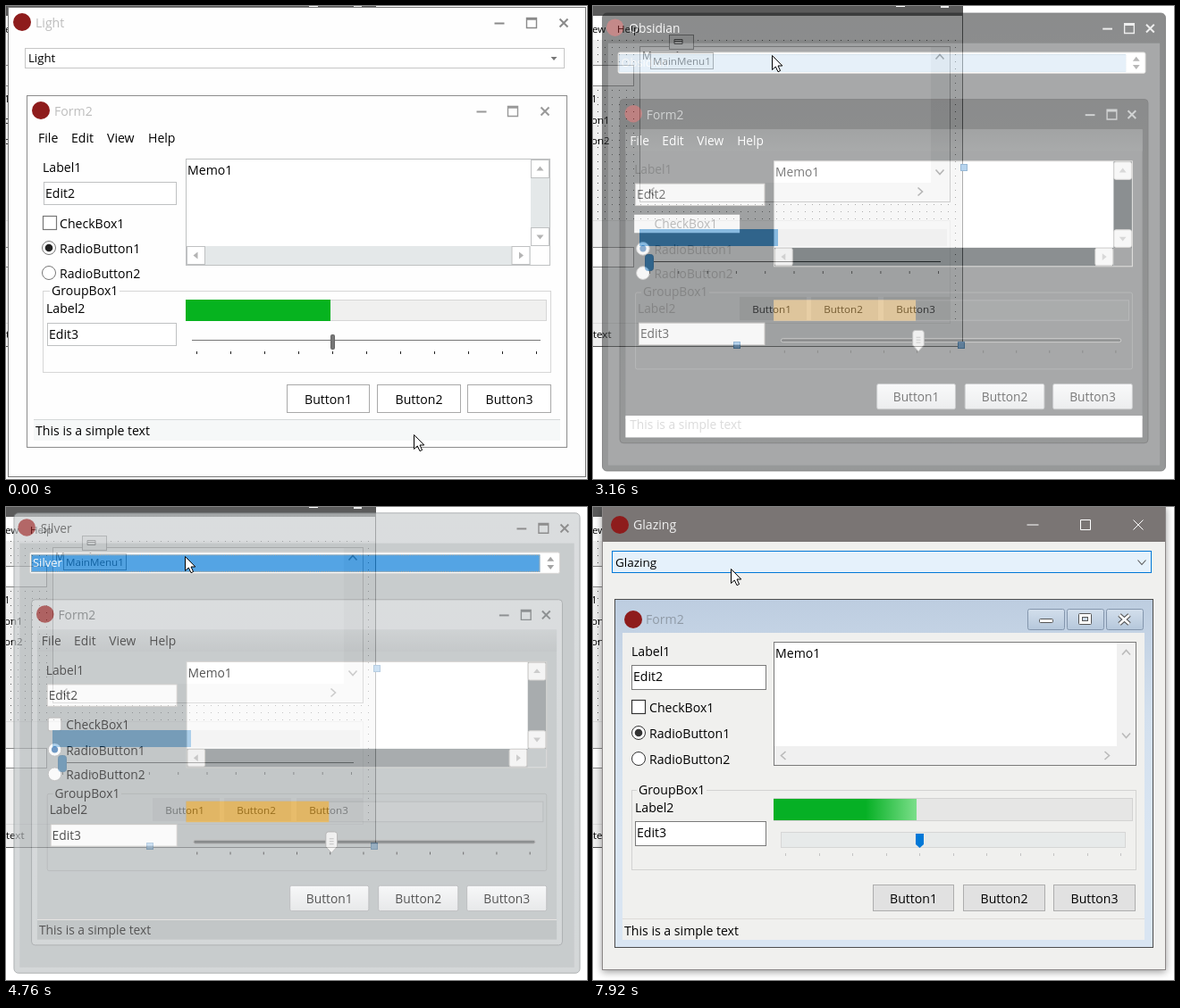
Write an HTML page that moves like this. It is 650 px wide and 530 px high and loops after 8000 ms.

```html
<!DOCTYPE html>
<html lang="en">
<head>
<meta charset="utf-8">
<title>Theme switcher</title>
<style>
  html, body { margin: 0; width: 100%; height: 100%; overflow: hidden; background: #fff; }
  svg { display: block; width: 650px; height: 530px; font: 14.1px "Open Sans", "Noto Sans", sans-serif; }
  #native { filter: drop-shadow(0 2px 4px rgba(0, 0, 0, .4)); }
</style>
</head>
<body>
<svg id="stage" viewBox="0 0 650 530"></svg>
<script>
const LOOP = 8000;
const LOGO = '#8e1c1c';

// Drawing helpers
const fillRect = (x, y, w, h, fill, more = '') =>
  `<rect x="${x}" y="${y}" width="${w}" height="${h}" fill="${fill}" ${more}/>`;
const box = (x, y, w, h, fill, stroke, r = 0, more = '') =>
  `<rect x="${x + .5}" y="${y + .5}" width="${w - 1}" height="${h - 1}" rx="${r}" fill="${fill}" stroke="${stroke}" ${more}/>`;
const path = (d, stroke, width = 1, fill = 'none') =>
  `<path d="${d}" stroke="${stroke}" stroke-width="${width}" fill="${fill}"/>`;
const circle = (x, y, r, fill, stroke = 'none') =>
  `<circle cx="${x}" cy="${y}" r="${r}" fill="${fill}" stroke="${stroke}"/>`;
const text = (x, y, s, fill = '#000', size = 14.1, anchor = 'start') =>
  `<text x="${x}" y="${y + 5}" fill="${fill}" font-size="${size}" text-anchor="${anchor}">${s}</text>`;
const gradient = (id, stops, axis = 'x2="0" y2="1"') => `<linearGradient id="${id}" ${axis}>` +
  stops.map((c, i) => `<stop offset="${i / (stops.length - 1)}" stop-color="${c}"/>`).join('') + '</linearGradient>';
const arrow = (x, y, turn, fill) =>
  `<path transform="translate(${x} ${y}) rotate(${turn})" d="M-4 2L0 -3L4 2Z" fill="${fill}"/>`;
const chevron = (x, y, turn, stroke, width = 1.6) =>
  `<path transform="translate(${x} ${y}) rotate(${turn})" d="M-4.5 2.5L0 -2.5L4.5 2.5" fill="none" stroke="${stroke}" stroke-width="${width}"/>`;

function captionButtons([a, b, c], y, color, width) {
  const s = width > 1 ? 4.5 : 5.5;
  return path(`M${a - s - 1} ${y + (width > 1 ? .5 : 0)}h${2 * s + 2}`, color, width) +
    path(`M${b - 5.5} ${y - 5.5}h11v11h-11z` + (width > 1 ? 'm0 1.5h11' : ''), color, width > 1 ? 1.4 : 1) +
    path(`M${c - s} ${y - s}l${2 * s} ${2 * s}m0 ${-2 * s}l${-2 * s} ${2 * s}`, color, width);
}

// Control positions: flat, framed and native looks
const FLAT = {
  label: [41, 181], edit2: [42, 197, 149, 26], check: [41, 235], radio: [48, 271, 299], tx: 60,
  group: [41, 319, 569, 92], groupText: 51, label2: [45, 339], edit3: [46, 355, 145, 26],
  memo: [201, 171, 408, 120], bar: [201, 329, 404, 24], fillW: 162, line: [208, 374, 390], ticks: [213, 387],
  buttons: [[314, 93], [415, 94], [516, 94]], by: [424, 32], status: [31, 463, 589, 24], statusText: [33, 476]
};
const FRAMED = {
  label: [39, 181], edit2: [40, 197, 149, 26], check: [41, 235], radio: [49, 272, 300], tx: 62,
  group: [40, 322, 571, 89], groupText: 49, label2: [43, 341], edit3: [44, 357, 145, 26],
  memo: [199, 171, 412, 122], bar: [199, 331, 408, 24], fillW: 163, line: [207, 377, 391], ticks: [211, 389],
  buttons: [[317, 91], [418, 92], [519, 92]], by: [427, 30], status: [29, 466, 593, 23], statusText: [31, 478]
};
const NATIVE = {
  label: [43, 162], edit2: [43, 177, 151, 28], check: [43, 216], radio: [51, 253, 282], tx: 63,
  group: [43, 317, 565, 90], groupText: 51, label2: [47, 337], edit3: [47, 352, 147, 28],
  memo: [202, 151, 406, 139], bar: [202, 326, 402, 26], fillW: 160, line: [210, 364, 386], ticks: [215, 388],
  buttons: [[313, 91], [414, 92], [515, 92]], by: [423, 30], status: [33, 461, 584, 24], statusText: [35, 475]
};

function scrollBars([x, y, w, h], t) {
  const right = x + w - 11.5, bottom = y + h - 11.5, cross = x + w - 33;
  if (t.kind === 'native') {
    return fillRect(x + w - 22, y + 1, 21, h - 2, '#f0f0f0') + fillRect(x + 1, y + h - 22, w - 2, 21, '#f0f0f0') +
      chevron(right, y + 12, 0, '#bababa') + chevron(right, y + h - 34, 180, '#bababa') +
      chevron(x + 11, bottom, -90, '#bababa') + chevron(cross, bottom, 90, '#bababa');
  }
  const button = (cx, cy, turn) => box(cx - 10.5, cy - 10.5, 21, 21, t.scrollBtn, t.border, t.r) + arrow(cx, cy, turn, '#b4b4b4');
  return fillRect(x + w - 22, y + 1, 21, h - 22, t.scroll) + fillRect(x + 1, y + h - 22, w - 23, 21, t.scroll) +
    fillRect(x + w - 22, y + h - 22, 21, 21, t.bg) +
    button(right, y + 11.5, 0) + button(right, y + h - 32.5, 180) +
    button(x + 11.5, bottom, -90) + button(cross, bottom, 90);
}

function slider(g, t) {
  const [x, y, w] = g.line;
  const [tx, ty] = g.ticks;
  let s = '';
  for (let i = 0; i < 11; i++) s += fillRect(Math.round(tx + i * (t.kind === 'native' ? 37.5 : 38)), ty, 1, 3, t.tick);
  if (t.kind === 'native')
    return s + box(x, y, w, 18, '#e7eaea', '#d6d6d6') + path('M361 366h9v12l-4.5 4l-4.5 -4z', 'none', 0, '#0078d7');
  if (t.kind === 'flat')
    return s + fillRect(x, y, w, 1, '#777') + box(363, y - 6, 5, 17, '#777', '#666', 1);
  return s + box(x, y - 2, w, 5, t.groove, '#a5a5a5', 2) +
    path('M358.5 369q0 -3 3 -3h7q3 0 3 3v14l-6.5 7l-6.5 -7z', '#999', 1, '#f1f1f0') +
    path(`M362.5 ${y - 3}h5m-5 3h5m-5 3h5`, '#aaa');
}

function controls(g, t) {
  const [cx, cy] = g.check, [rx, r1, r2] = g.radio, [gx, gy] = g.group, [bx, by, , bh] = g.bar;
  const [top, height] = g.by;
  const native = t.kind === 'native', inset = native ? 1 : 0;
  const edge = native ? '#7a7a7a' : t.border;
  const rim = t.kind === 'framed' ? '#aaa' : native ? '#333' : '#777';
  return fillRect(...g.status, t.status) + fillRect(g.status[0], g.status[1], g.status[2], 1, t.kind === 'flat' ? '#d5d8d9' : '#dedbd8') +
    text(...g.label, 'Label1', t.ink) +
    box(...g.edit2, '#fff', edge) + text(g.edit2[0] + 2, g.edit2[1] + 13, 'Edit2') +
    box(cx, cy, 16, 16, '#fff', rim, t.r, 'stroke-width="1.2"') + text(g.tx, cy + 9, 'CheckBox1', t.ink) +
    circle(rx, r1, 7.5, t.radio, rim) + circle(rx, r1, t.kind === 'framed' ? 3.7 : 4.3, t.dot) + text(g.tx, r1 + 1, 'RadioButton1', t.ink) +
    circle(rx, r2, 7.5, '#fff', rim) + text(g.tx, r2 + 1, 'RadioButton2', t.ink) +
    box(...g.group, 'none', t.groupEdge, t.r) + fillRect(g.groupText - 2, gy - 2, 78, 5, t.bg) + text(g.groupText, gy, 'GroupBox1', t.ink) +
    text(...g.label2, 'Label2', t.ink) +
    box(...g.edit3, '#fff', edge) + text(g.edit3[0] + 2, g.edit3[1] + 13, 'Edit3') +
    box(...g.memo, '#fff', edge) + scrollBars(g.memo, t) + text(g.memo[0] + 2, g.memo[1] + 13, 'Memo1') +
    box(...g.bar, t.barBack, t.groupEdge) +
    fillRect(bx, by + inset, g.fillW, bh - 2 * inset, t.bar, 'class="fill"') +
    slider(g, t) +
    g.buttons.map(([x, w], i) => box(x, top, w, height, t.button, t.buttonEdge, t.r) +
      text(x + w / 2, top + height / 2 + .5, 'Button' + (i + 1), '#000', 14.1, 'middle')).join('') +
    text(...g.statusText, 'This is a simple text', t.statusInk || t.ink);
}

const menu = (x, ink) => [['File', 0], ['Edit', 37], ['View', 77], ['Help', 123]].map(([s, d]) => text(x + d, 148, s, ink)).join('');

function flatForm(t) {
  const idle = t.idle;
  let s = box(2, 1, 647, 527, t.bg, '#777') + circle(18, 18, 10, LOGO) +
    text(33, 19, t.name, idle ? '#bdbdbd' : '#111') + captionButtons([552, 588, 624], 19, '#8a8a8a', 2) +
    box(21, 47, 604, 23, '#fff', idle ? '#c6c6c6' : '#a3c4df', 0, 'class="comboEdge"');
  if (!idle) {
    s += fillRect(23, 49, 580, 20, '#0078d7') + box(23, 49, 580, 20, 'none', '#d08a40', 0, 'stroke-dasharray="1 1"') +
      fillRect(603, 49, 1, 20, '#ccdbe8');
  }
  return s + text(25, 58, t.name, idle ? '#000' : '#fff', 13.2) + path('M609.5 57h7l-3.5 4z', 'none', 0, '#777') +
    box(23, 100, 605, 395, t.bg, '#8c8c8c') + circle(39, 117, 10, LOGO) + text(54, 118, 'Form2', '#bdbdbd') +
    captionButtons([532, 567, 603], 118, '#999', 2) + menu(36, '#000') + controls(FLAT, t);
}

function framedForm(t) {
  const id = t.id;
  return '<defs>' + gradient(id + 'Frame', t.frame) + gradient(id + 'Menu', t.menu) + gradient(id + 'Button', ['#f4f5f6', '#dcdee0']) + '</defs>' +
    box(2, 1, 647, 527, `url(#${id}Frame)`, t.edge, 5) + fillRect(9, 36, 633, 485, t.bg) +
    circle(17, 18, 10, LOGO) + text(33, 19, t.name, t.title) + captionButtons([582, 607, 631], 19, t.caption, 2) +
    box(20, 46, 606, 25, '#fff', t.border, 2) + fillRect(22, 49, 581, 20, '#0078d7') +
    box(22, 49, 581, 20, 'none', '#c98f52', 0, 'stroke-dasharray="1 1"') + fillRect(22, 49, 581, 20, '#d0e4f4', 'class="pale"') +
    text(24, 58, t.name, '#fff', 13.2) + arrow(615, 54.5, 0, '#777') + arrow(615, 63, 180, '#777') +
    box(22, 100, 607, 396, `url(#${id}Frame)`, t.edge, 4) + fillRect(29, 135, 593, 354, t.bg) +
    fillRect(29, 135, 593, 25, `url(#${id}Menu)`) +
    circle(38, 117, 10, LOGO) + text(53, 118, 'Form2', t.dimTitle) + captionButtons([562, 587, 610], 118, t.dimTitle, 2) +
    menu(34, t.menuInk) + controls(FRAMED, t) +
    (t.unpainted ? `<g class="pale">${fillRect(39, 233, 121, 21, '#fff')}${fillRect(29, 464, 593, 25, '#fff')}` +
      text(62, 244, 'CheckBox1', '#888') + text(34, 474, 'This is a simple text', '#bbb') + '</g>' : '');
}

function nativeForm(t) {
  const glass = x => box(x, 114, 42, 24, 'url(#glass)', '#8496ad', 2);
  const cross = (color, width) => path('M589 121l11 10m0 -10l-11 10', color, width);
  return '<defs>' + gradient('aero', ['#bdcde0', '#d3e0ee', '#d9e5f2', '#d9e5f2']) + gradient('glass', ['#d3dfec', '#b5c7db']) +
    gradient('shine', ['#06b025', '#7fe08d'], 'gradientUnits="userSpaceOnUse" x1="305" x2="364" y1="0" y2="0"') + '</defs>' +
    fillRect(10, 0, 631, 519, t.bg) + fillRect(10, 0, 631, 39, '#7a7574') + box(10, -1, 631, 520, 'none', '#8a8686') +
    circle(30, 20, 10, LOGO) + text(45, 20, t.name, '#f0f0f0') + captionButtons([492, 551, 610], 20, '#fff', 1) +
    box(21, 49, 604, 25, '#e5f1fb', '#0078d7', 0, 'class="combo"') + text(25, 62, t.name, '#000', 13.5) + chevron(614, 62, 180, '#555', 1.1) +
    box(24, 103, 603, 391, 'url(#aero)', '#4c4c4c') + fillRect(33, 141, 584, 344, t.bg) +
    circle(45, 126, 10, LOGO) + text(59, 126, 'Form2', '#8f9aa6') + glass(486) + glass(530) + glass(574) +
    box(499, 125, 16, 5, '#fff', '#555', 1) + box(543, 119, 15, 13, '#fff', '#555', 1) + box(547, 123, 7, 5, '#cbd8e6', '#555') +
    cross('#555', 5) + cross('#fff', 2.6) + controls(NATIVE, t);
}

// Looks
const flat = {
  kind: 'flat', bg: '#fefefe', ink: '#000', border: '#bfc1c2', groupEdge: '#d6d6d6', scroll: '#e4e8e9', scrollBtn: '#fff', r: 0,
  barBack: '#f0f0ef', bar: '#06b31f', tick: '#222', radio: '#fff', dot: '#222', button: '#fff', buttonEdge: '#a9a9a9', status: '#f6f8f8'
};
const framed = (id, name, look) => ({
  kind: 'framed', id, name, ink: '#000', menuInk: '#000', border: '#c3c0bd', groupEdge: '#bdbab6', scrollBtn: '#f0f0f0', r: 2,
  groove: '#c9c6c3', tick: '#222', button: `url(#${id}Button)`, buttonEdge: '#9d9fa2', ...look
});
const themes = [
  { at: 0, id: 'idle', draw: flatForm, t: { ...flat, name: 'Light', idle: true } },
  { at: 1080, id: 'light', draw: flatForm, t: { ...flat, name: 'Light' } },
  { at: 2000, id: 'lilac', draw: framedForm, t: framed('lilac', 'Lilac', {
    frame: ['#d5dced', '#b9c4dc'], menu: ['#f3f5fa', '#dde3f0'], bg: '#eceff6', edge: '#8592b0', title: '#222', caption: '#667', dimTitle: '#8a93a8',
    scroll: '#dfe4ee', barBack: '#e6e9ef', bar: '#5b8fd0', radio: '#fff', dot: '#3c6fae', status: '#e2e7f1' }) },
  { at: 3000, id: 'obsidian', draw: framedForm, t: framed('obsidian', 'Obsidian', {
    frame: ['#202223', '#383b3c'], menu: ['#4c4f50', '#5a5d5e'], bg: '#56595a', edge: '#161718', title: '#f2f2f2', caption: '#e0e0e0', dimTitle: '#a8abac',
    ink: '#202223', menuInk: '#fff', statusInk: '#eee', scroll: '#20282c', barBack: '#5d6061', bar: '#e0b060', groupEdge: '#77797a',
    radio: '#fff', dot: '#2f6fb0', groove: '#303334', status: '#4b4e4f', unpainted: true }) },
  { at: 3840, id: 'silver', draw: framedForm, t: framed('silver', 'Silver', {
    frame: ['#c9cdcf', '#bfc4c6'], menu: ['#b8bdbf', '#a9aeb0'], bg: '#aeb3b5', edge: '#858a8c', title: '#333', caption: '#555', dimTitle: '#555a5c',
    scroll: '#7d8486', barBack: '#b4b8ba', bar: '#e3a32a', groupEdge: '#989d9f', radio: '#fff', dot: '#2f6fb0', groove: '#55595b', status: '#a5aaac' }) },
  { at: 4760, id: 'marble', draw: framedForm, t: framed('marble', 'Cloudy Marble Torvi', {
    frame: ['#4b4a46', '#353431', '#353431', '#353431', '#353431'], menu: ['#d2cecb', '#e9e5e2'], bg: '#efebe7', edge: '#2a2927',
    title: '#f2f2f2', caption: '#d0cfcd', dimTitle: '#7b7975', scroll: '#dcdad8', barBack: '#dbd8d6', bar: '#e67849',
    radio: '#e67849', dot: '#4a2a1c', status: '#ebe7e3' }) },
  { at: 6080, id: 'native', draw: nativeForm, t: {
    kind: 'native', name: 'Glazing', bg: '#f0f0ee', ink: '#000', border: '#7a7a7a', groupEdge: '#d3d3d2', r: 0, barBack: '#e6e6e5',
    bar: 'url(#shine)', tick: '#c4c4c4', radio: '#fff', dot: '#333', button: '#e1e1e1', buttonEdge: '#adadad', status: '#f0f0ee' } }
];

// Form designer seen behind the themed form
function backdrop() {
  let s = '<defs><pattern id="dots" width="8" height="8" patternUnits="userSpaceOnUse"><rect x="5" y="6" width="1" height="1" fill="#555"/></pattern></defs>' +
    fillRect(0, 0, 650, 530, '#fff') + fillRect(0, 0, 414, 11, '#5b5b5b') + fillRect(339, 0, 10, 1, '#fff') + fillRect(389, 0, 9, 2, '#eee') +
    fillRect(0, 11, 413, 27, '#fff') + fillRect(0, 38, 413, 343, '#f0f0f0') + fillRect(0, 38, 413, 320, 'url(#dots)') +
    path('M413.5 0V381.5H0', '#555') + fillRect(0, 356, 413, 25, '#f0f0f0') +
    box(-5, 66, 51, 24, '#fff', '#888') + box(-5, 240, 405, 116, '#f0f0f0', '#ddd') + box(-5, 270, 51, 23, '#fff', '#888') +
    box(52, 45, 348, 175, '#fff', '#999') + fillRect(378, 46, 21, 173, '#f0f0f0') + fillRect(53, 198, 346, 21, '#f0f0f0') +
    chevron(388, 57, 0, '#666') + chevron(388, 186, 180, '#666') + chevron(366, 208, 90, '#666') + chevron(66, 208, -90, '#666') +
    text(55, 55, 'Memo1', '#333', 12) + box(85, 32, 28, 17, '#f0f0f0', '#888') + path('M91 37.5h9v5h-9zm0 2h9', '#444') +
    box(64, 52, 71, 19, '#f5f5f5', '#777') + text(67, 61, 'MainMenu1', '#333', 11.6) +
    fillRect(52, 250, 344, 19, '#e0e0e0') + fillRect(52, 250, 155, 19, '#0870c0') +
    path('M63 286.5H389', '#222') + box(58, 278, 10, 19, '#0870c0', '#0860a8', 3);
  for (let i = 0; i < 11; i++) s += fillRect(63 + i * 32.3, 297, 1, 3, '#444');
  [164, 244, 325].forEach((x, i) => {
    s += fillRect(x, 326, 75, 26, '#ddd') + text(x + 36, 339, 'Button' + (i + 1), '#000', 11.6, 'middle');
  });
  for (const [x, y] of [[157, 376], [408, 376], [411, 177]]) s += box(x, y, 8, 8, '#6aa6dc', '#2a6eaa');
  for (const [x, y, w] of [[-1, 25, 'ew'], [27, 25, 'Help'], [-2, 103, '1'], [-2, 127, 'on1'], [-2, 150, 'on2'], [0, 367, 'text']])
    s += text(x, y, w, '#000', 11.6);
  return s;
}

const stage = document.getElementById('stage');
stage.innerHTML = backdrop() + themes.map(w => `<g id="${w.id}">${w.draw(w.t)}</g>`).join('') +
  '<path id="cursor" d="M.5 .5V16.5L4.3 13L7 18.7L9.6 17.5L7 12H11.8Z" fill="#fff" stroke="#000"/>';

for (const w of themes) {
  w.node = document.getElementById(w.id);
  w.pale = w.node.querySelectorAll('.pale');
  w.centreY = w.id === 'native' ? 259.5 : 264.5;
}
const cursor = document.getElementById('cursor');
const comboEdge = themes[0].node.querySelector('.comboEdge');
const combo = document.querySelector('#native .combo');
const progress = document.querySelector('#native .fill');

// Pointer path: time, x, y
const pointer = [
  [0, 456, 480], [240, 456, 480], [400, 350, 290], [560, 228, 86], [680, 228, 86], [800, 208, 40], [840, 203, 31], [920, 200, 55],
  [6720, 200, 55], [6960, 225, 130], [7240, 240, 255], [7560, 222, 333], [7600, 222, 333], [7760, 180, 190], [7920, 154, 69], [8000, 154, 69]
];
const clamp = v => Math.max(0, Math.min(1, v));

function pointerAt(t) {
  const i = Math.max(1, pointer.findIndex(p => p[0] >= t));
  const a = pointer[i - 1], b = pointer[i];
  const k = clamp((t - a[0]) / (b[0] - a[0]));
  return [1, 2].map(n => Math.round(a[n] + (b[n] - a[n]) * k));
}

function place(w, opacity, scale) {
  w.node.style.display = opacity > 0 ? '' : 'none';
  w.node.setAttribute('opacity', opacity);
  w.node.setAttribute('transform', scale === 1 ? '' :
    `translate(325.5 ${w.centreY}) scale(${scale}) translate(-325.5 ${-w.centreY})`);
}

function render(t) {
  const now = themes.filter(w => w.at <= t).length - 1;
  themes.forEach((w, i) => {
    if (i === now) {
      const p = i ? clamp((t - w.at - 60) / (w.id === 'native' ? 190 : 270)) : 1;
      place(w, clamp(1.4 * p), 1 - .1 * (1 - p) ** 3);
      w.pale.forEach(n => n.style.display = p < .7 ? '' : 'none');
    } else if (i === now - 1) {
      const out = clamp((t - themes[now].at + 40) / 120);
      place(w, 1 - out, 1 - .06 * out);
    } else place(w, 0, 1);
  });
  const [x, y] = pointerAt(t);
  cursor.setAttribute('transform', `translate(${x} ${y})`);
  comboEdge.setAttribute('stroke', t >= 760 ? '#a3c4df' : '#c6c6c6');
  const hot = y >= 49 && y < 75;
  combo.setAttribute('fill', hot ? '#e5f1fb' : '#e1e1e1');
  combo.setAttribute('stroke', hot ? '#0078d7' : '#adadad');
  progress.setAttribute('width', 160 * clamp((t - 6140) / 320));
}

const start = performance.now();
function tick() {
  const t = (performance.now() - start) % LOOP;
  render(Math.floor(t / 40) * 40);
  requestAnimationFrame(tick);
}
tick();
</script>
</body>
</html>
```
